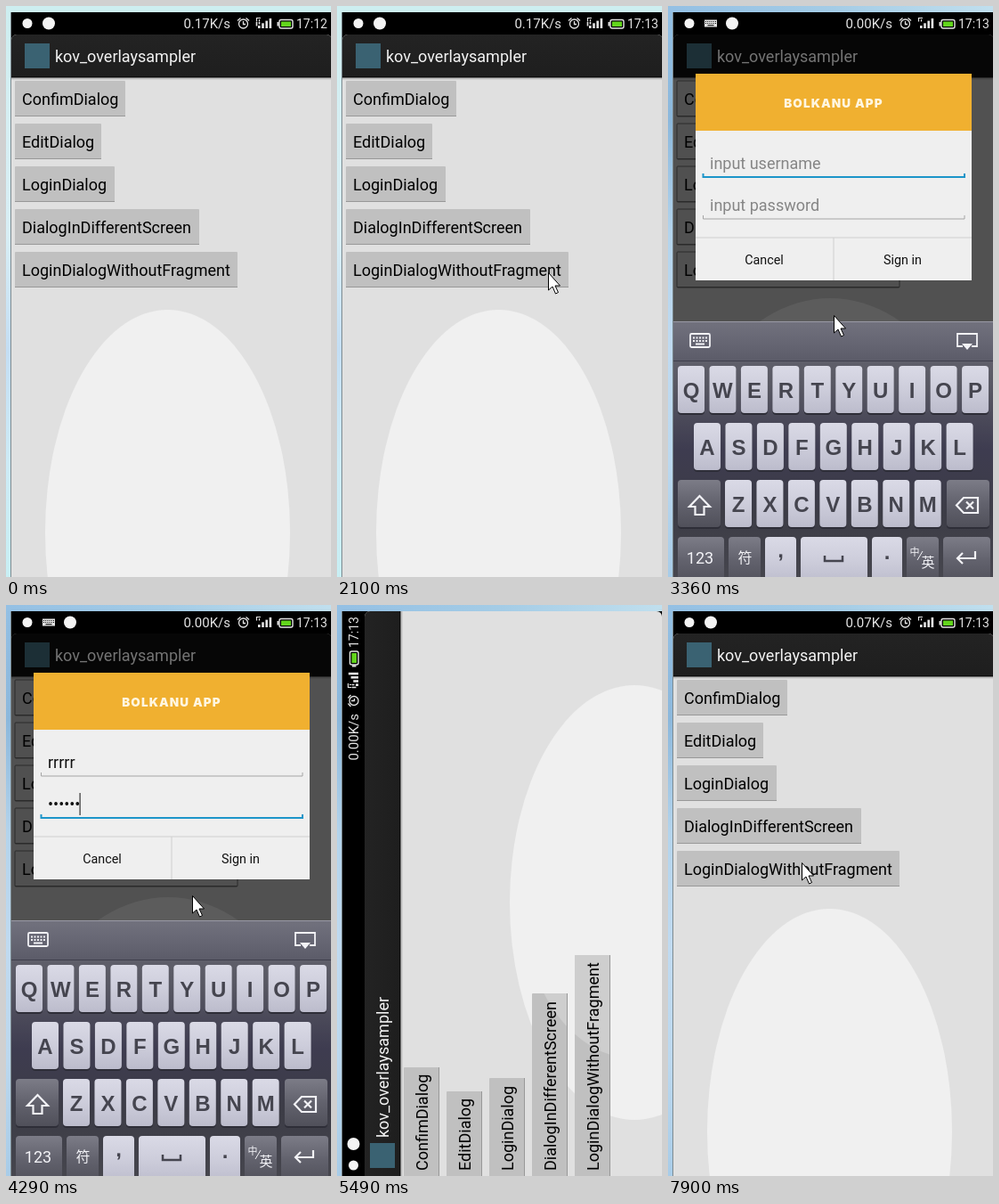
These frames come from a looping animation (365 by 641 pixels, 8 s). An HTML page:

```html
<!DOCTYPE html>
<html lang="en">
<head>
<meta charset="utf-8">
<title>Dialog demo</title>
<style>
html, body { margin: 0; width: 100%; height: 100%; overflow: hidden; background: #000; }
svg { display: block; width: 100vw; height: 100vh; }
text { font-family: Roboto, "Noto Sans CJK SC", sans-serif; font-size: 18px; white-space: pre; }
.status text { font-size: 14px; fill: #e4e4e4; }
.status .speed { font-size: 15px; }
.btn { fill: #c0c0c0; }
.edge { fill: #989898; }
.dim .btn { fill: #dedede; stroke: #777; }
.dim .edge { fill: #777; }
.dim .bar { fill: #0c0c0c; }
.line { fill: none; stroke: #e4e4e4; }
.brand { font: 900 13.5px Inter, sans-serif; letter-spacing: 1.1px; fill: #fff6e0; text-anchor: middle; }
.action { font-size: 14.3px; fill: #111; text-anchor: middle; }
.cap { font: 700 24px "Liberation Sans", sans-serif; fill: #45454f; text-anchor: middle; }
.fn { fill: #f2f2f6; text-anchor: middle; }
.glyph { fill: none; stroke: #f2f2f6; stroke-width: 2.2; }
</style>
</head>
<body>
<svg id="stage" viewBox="0 0 365 641" preserveAspectRatio="none"></svg>
<script>
const LOOP = 8000, STEP = 100;
const stage = document.getElementById('stage');

const rect = (x, y, w, h, fill, more = '') =>
  `<rect x="${x}" y="${y}" width="${w}" height="${h}" fill="${fill}" ${more}/>`;
const text = (x, y, s, more = '') => `<text x="${x}" y="${y}" ${more}>${s}</text>`;
const path = (d, more = '') => `<path d="${d}" ${more}/>`;
const ellipse = (cx, cy, rx, ry, fill, more = '') =>
  `<ellipse cx="${cx}" cy="${cy}" rx="${rx}" ry="${ry}" fill="${fill}" ${more}/>`;
const gradient = (id, colors, across) =>
  `<linearGradient id="${id}" x2="${across ? 1 : 0}" y2="${across ? 0 : 1}">` + colors.map((c, i) =>
    `<stop offset="${i / (colors.length - 1)}" stop-color="${c}"/>`).join('') + '</linearGradient>';

const BUTTONS = [
  ['ConfimDialog', 124], ['EditDialog', 97], ['LoginDialog', 112],
  ['DialogInDifferentScreen', 207], ['LoginDialogWithoutFragment', 250]
];

function statusBar(shift) {
  const bars = [0, 1, 2, 3].map(i => rect(283 + i * 4.2, 22 - i * 2.7, 2.6, 3 + i * 2.7, '#e4e4e4')).join('');
  return `<g class="status">
    <circle cx="24" cy="19.5" r="5.5" fill="#f4f4f4"/>
    <g class="ime">${rect(41, 15.5, 14, 8, '#e4e4e4')}
      ${path('M42 17.5H54M42 19.5H54', 'stroke="#000" stroke-dasharray="1 1.2"')}
      ${path('M44.5 21.7H51.5', 'stroke="#000"')}</g>
    <circle class="app" cx="48" cy="19.5" r="7" fill="#f4f4f4"/>
    <g transform="translate(${shift})">
      <text class="speed" x="252" y="25" text-anchor="end"></text>
      <g class="line" stroke-width="1.3"><circle cx="266.5" cy="20" r="5"/>
        ${path('M266.5 17V20.5H269M260 16.5L263.5 13.5M273 16.5L269.5 13.5')}</g>
      ${bars}${path('M281.5 13V17.5M281 13.5H286M284.5 15V17.5', 'class="line" stroke-width="1.2"')}
      ${path('M281.5 18V22.5M284.5 18V20.5', 'class="line arrows" stroke-width="1.6"')}
      ${rect(307, 15.5, 15, 9.5, 'none', 'rx="2" stroke="#e4e4e4" stroke-width="1.4"')}
      ${rect(304.5, 18, 2, 4.5, '#e4e4e4')}${rect(309, 17.5, 11, 5.5, '#62d51c')}
      <text class="clock" x="326" y="25"></text>
    </g></g>`;
}

function buttons(top, glow) {
  const each = f => BUTTONS.map(([label, w], i) => f(label, w, top + 48 * i)).join('');
  return each((label, w, y) => rect(10, y, w, 40, '', 'class="btn" rx="1"')) + glow +
    each((label, w, y) => rect(10, y + 39, w, 1, '', 'class="edge"') + text(18, y + 27, label));
}

function screen(land) {
  const w = land ? 640 : 360, h = land ? 360 : 640, bottom = land ? 72 : 80;
  const mid = (32 + bottom) / 2;
  const oval = land ? ellipse(319, 335, 244, 140, '#f0f0f0')
    : ellipse(181.5, 591, 137.5, 250, '#f0f0f0', 'id="oval"') +
      ellipse(182, 600, 145, 305, '#fff', 'id="dimOval" clip-path="url(#below)"');
  const glow = land ? ellipse(319, 335, 175, 125, '#cecece', 'clip-path="url(#onButtons)"') : '';
  return rect(6, 7, w, h, '#000') + statusBar(land ? 279 : 0) +
    `<g clip-path="url(#${land ? 'wide' : 'tall'})">
      ${rect(6, 32, w, h, '#e0e0e0')}${oval}
      ${rect(6, 32, w, bottom - 32, 'url(#barFill)', 'class="bar"')}
      ${rect(6, bottom - 1, w, 1.5, '#0c0c0c')}${rect(6, bottom + .5, w, 2, '#000', 'opacity=".15"')}
      ${rect(21, mid - 14, 28, 28, '#3a6272')}
      ${text(55, mid + 7, 'kov_overlaysampler', 'fill="#f3f3f3"')}
      ${buttons(bottom + 4, glow)}
    </g>`;
}

function field(y, id) {
  return text(47, y - 9, '', `id="${id}"`) +
    path(`M39.5 ${y - 4}V${y}H333V${y - 4}`, `id="${id}Line" fill="none"`);
}

function dialog() {
  return rect(31, 223, 310, 232, '#efefef') + rect(31, 223, 310, 64, '#f0b030') +
    text(186, 261, 'BOLKANU APP', 'class="brand"') + field(339, 'user') + field(386, 'pass') +
    rect(82, 358, 1.2, 25, '#333', 'id="caret"') +
    rect(31, 406.5, 310, 1, '#cfcfcf') + rect(185.5, 407, 1, 48, '#cfcfcf') +
    text(108, 437, 'Cancel', 'class="action"') + text(263.5, 437, 'Sign in', 'class="action"');
}

function keyboard() {
  const key = (x, y, w, kind) =>
    rect(x, y + 2, w, 53, '#2e2e38', 'rx="4"') + rect(x, y, w, 53, `url(#${kind}Key)`, 'rx="4"');
  const letters = ['QWERTYUIOP', 'ASDFGHJKL', 'ZXCVBNM'].map((row, r) => [...row].map((c, i) => {
    const x = [11, 29, 64][r] + i * 35.45, y = 404 + r * 64;
    return key(x, y, 30, 'light') + text(x + 15, y + 36, c, 'class="cap"');
  }).join('')).join('');
  let x = 11;
  const lastRow = [52, 36, 35, 75, 34, 36, 53].map((w, i) => {
    const k = key(x, 596, w, i > 1 && i < 5 ? 'light' : 'dark');
    x += w + 5;
    return k;
  }).join('');
  return rect(6, 354, 360, 287, 'url(#board)') + rect(6, 354, 360, 44, 'url(#tools)') +
    rect(6, 354, 360, 1, '#9a9aa6') + rect(6, 398, 360, 1, '#3f3f4c') +
    letters + key(11, 532, 48, 'dark') + key(313, 532, 48, 'dark') + lastRow +
    text(126.5, 619, ',', 'class="cap"') + text(246, 621, '.', 'class="cap"') +
    path('M176 617V623H196V617', 'fill="none" stroke="#45454f" stroke-width="2.5"') +
    text(36, 626, '123', 'class="fn"') +
    text(86.5, 625, '符', 'class="fn" style="font-size:16px"') +
    text(277, 617, '中', 'class="fn" style="font-size:11px"') +
    path('M280 622L286 612', 'class="glyph" style="stroke-width:1"') +
    text(292, 630, '英', 'class="fn" style="font-size:15px"') +
    `<g class="glyph">
      ${path('M35.5 550L24 562H30.5V571H40.5V562H47Z')}
      ${path('M324 560.5L332 552H348V569H332ZM335 556.5L343 564.5M343 556.5L335 564.5')}
      ${path('M345 612V620H325M331 614L325 620L331 626')}
      <g stroke-width="1.8">${rect(25, 368, 22, 15, 'none', 'rx="1.5"')}
      ${path('M28 372.5H44M28 376H44', 'stroke-dasharray="2 1.5"')}
      ${path('M31 379.5H41M331 382H325V368H347V382H341')}</g>
    </g>` + path('M330 379H342L336 386Z', 'fill="#f2f2f6"');
}

stage.innerHTML = `<defs>
  ${gradient('pale', ['#cdeef0', '#d6eff3', '#d8eef5', '#c4def4', '#cdebf6', '#c8eff4'])}
  ${gradient('blue', ['#94c0e4', '#8cb8dc', '#b4d4ec', '#c0daf0', '#bcd8ee', '#a8cce8'])}
  ${gradient('paleTop', ['#cdeef0', '#cdeef0'], true)}
  ${gradient('blueTop', ['#94c0e4', '#a4cce6', '#c0dfee'], true)}
  ${gradient('barFill', ['#232323', '#1e1e1e'])}
  ${gradient('lightKey', ['#dadae6', '#cdcddb', '#bcbccc'])}
  ${gradient('darkKey', ['#7c7c87', '#62626d', '#50505a'])}
  ${gradient('tools', ['#72727e', '#5c5c69'])}
  ${gradient('board', ['#6a6a76', '#585863', '#3e3c50', '#3c3c46', '#46464e'])}
  <clipPath id="tall">${rect(6, 32, 360, 615, '', 'rx="6"')}</clipPath>
  <clipPath id="wide">${rect(6, 32, 640, 334, '', 'rx="6"')}</clipPath>
  <clipPath id="onButtons">${BUTTONS.map(([, w], i) => rect(10, 76 + 48 * i, w, 39, '')).join('')}</clipPath>
  <clipPath id="below">${rect(0, 308, 365, 400, '', 'id="belowBox"')}</clipPath>
</defs>
${rect(0, 0, 365, 641, '', 'id="desk"')}${rect(0, 0, 365, 7, '', 'id="deskTop"')}${rect(5, 7, 1, 634, '#7d8a90')}
<g id="portrait">${screen(false)}
  <g id="shade">${rect(6, 32, 360, 48, '#000', 'opacity=".52"')}${rect(6, 80, 360, 561, '#000', 'opacity=".64"')}</g>
  <g id="dialog">${dialog()}</g>
  <g id="keys">${keyboard()}</g>
</g>
<g id="landscape" transform="translate(-1 653) rotate(-90)">${screen(true)}</g>
${path('M.5 .5V20L5 16L8.5 24L11.5 22.5L8 15H13.5Z', 'id="mouse" fill="#fff" stroke="#000"')}`;

const AT = { dialog: 2500, ime: 3210, keys: 3360, user: 3620, pass: 3760, rotate: 5490, back: 7430 };

// Pointer strokes; one whose start equals its end is a jump.
const STROKES = [
  { from: 0, to: 900, x: 314, y: 330 },
  { from: 900, to: 1800, x: 237, y: 299 },
  { from: 2300, to: 2900, x: 214, y: 299 },
  { from: 3100, to: 3600, x: 134, y: 434 },
  { from: 3600, to: 4100, x: 209, y: 326 },
  { from: 4200, to: 4700, x: 316, y: 361 },
  { from: 5400, to: 5400, x: 390, y: 390 },
  { from: 6000, to: 6600, x: 232, y: 556 },
  { from: 6600, to: 7100, x: 211, y: 533 },
  { from: 7600, to: 7900, x: 150, y: 289 }
];

function mouseAt(t) {
  let x = 380, y = 665;
  for (const s of STROKES) {
    if (t < s.from) break;
    const p = s.to > s.from ? Math.min(1, (t - s.from) / (s.to - s.from)) : 1;
    const ease = p * p * (3 - 2 * p);
    x += (s.x - x) * ease;
    y += (s.y - y) * ease;
  }
  return [Math.round(x), Math.round(y)];
}

const el = id => document.getElementById(id);
const all = (cls, f) => stage.querySelectorAll('.' + cls).forEach(f);
const show = (node, on) => node.setAttribute('visibility', on ? 'inherit' : 'hidden');
const set = (id, attrs) => Object.entries(attrs).forEach(([k, v]) => el(id).setAttribute(k, v));
const clamp = (v, lo, hi) => Math.min(hi, Math.max(lo, v));

function setField(id, value, hint, focus) {
  el(id).textContent = value || hint;
  set(id, { fill: value ? '#111' : '#858585' });
  set(id + 'Line', { stroke: focus ? '#1c95c9' : '#a4a4a4', 'stroke-width': focus ? 2 : 1 });
}

function speedAt(t) {
  if (t < AT.dialog) return '0.17';
  if (t < AT.ime) return '0.30';
  if (t < 5750) return '0.00';
  return t < 7180 ? '0.12' : '0.07';
}

function draw(now) {
  const t = now % LOOP;
  const tick = Math.floor(t / STEP) * STEP;
  const land = t >= AT.rotate && t < AT.back;
  const open = t < AT.rotate ? clamp((tick - AT.dialog) / 400, 0, 1) : 0;
  const typing = t >= AT.keys && t < AT.rotate;
  const wall = t < AT.dialog ? 'pale' : 'blue';

  set('desk', { fill: `url(#${wall})` });
  set('deskTop', { fill: `url(#${wall}Top)` });
  show(el('portrait'), !land);
  show(el('landscape'), land);
  el('portrait').classList.toggle('dim', open > 0);
  show(el('oval'), !open);
  show(el('dimOval'), open > 0);
  set('dimOval', typing ? { rx: 185, ry: 272 } : { rx: 145, ry: 305 });
  set('belowBox', { y: typing ? 308 : 461 });
  set('shade', { opacity: open });
  set('dialog', { opacity: open, transform: `translate(0 ${typing ? -147 : 0})` });
  show(el('keys'), typing);

  const dots = t < AT.pass ? 0 : Math.min(6, 3 + 2 * Math.floor((t - AT.pass) / 140));
  const blink = t >= 5090 && t < 5330;
  setField('user', t >= AT.user ? 'rrrrr' : '', 'input username', t < AT.pass);
  setField('pass', '•'.repeat(dots), 'input password', t >= AT.pass);
  set('caret', { x: 46.5 + dots * 6 });
  show(el('caret'), typing && dots > 0 && !blink);

  const ime = t >= AT.ime && t < AT.rotate;
  all('speed', n => n.textContent = speedAt(t) + 'K/s');
  all('clock', n => n.textContent = t < 500 ? '17:12' : '17:13');
  all('arrows', n => show(n, t < 2760 || (t >= 5330 && t < AT.back)));
  all('ime', n => show(n, ime));
  all('app', n => n.setAttribute('cx', ime ? 72 : 48));

  set('mouse', { transform: `translate(${mouseAt(tick).join(' ')})` });
}

const start = performance.now();
function loop() {
  draw(performance.now() - start);
  requestAnimationFrame(loop);
}
loop();
</script>
</body>
</html>
```
